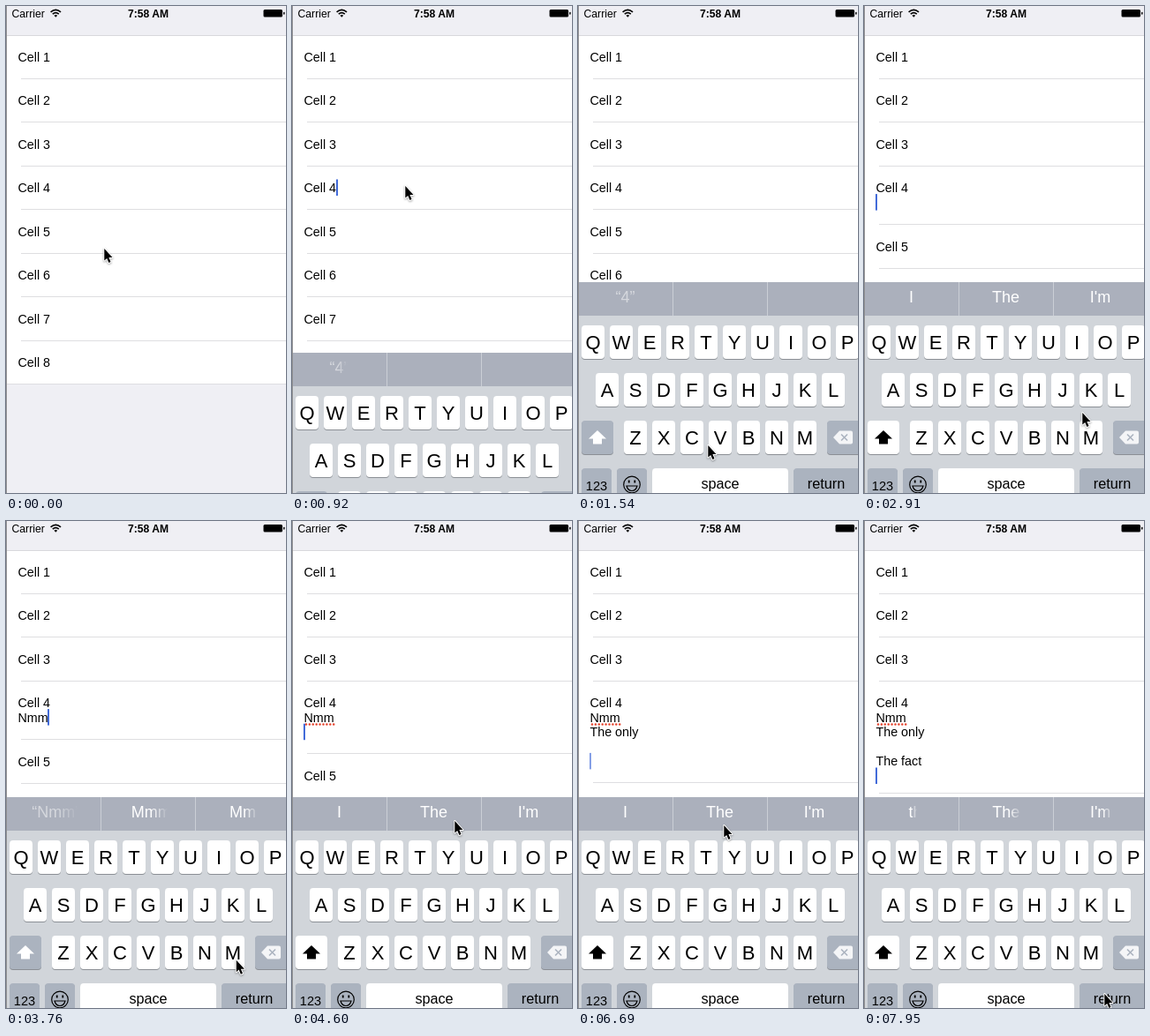
Recreate the animation shown at these times as an HTML page. Size 317 px wide and 552 px high, loop 8 s.

```html
<!DOCTYPE html>
<html lang="en">
<head>
<meta charset="utf-8">
<title>Growing table cell</title>
<style>
  html, body { margin: 0; width: 100%; height: 100%; overflow: hidden; background: #efeff4; }
  svg { display: block; width: 317px; height: 552px; font-family: "Liberation Sans", Arial, sans-serif; }
  text { white-space: pre; }
  .pointer { filter: drop-shadow(0 1px 1px rgba(0, 0, 0, .35)); }
</style>
</head>
<body>
<script>
const DURATION = 8000;
const LINE = 16.6, GROW = 16.5, ROW = 49.5;
const BODY = 14.3, WORD = 18;
const FONT = '"Liberation Sans", Arial, sans-serif';

function el(parent, name, attrs = {}, content) {
  const node = document.createElementNS('http://www.w3.org/2000/svg', name);
  set(node, attrs);
  if (content !== undefined) node.textContent = content;
  return parent.appendChild(node);
}
function set(node, attrs) {
  for (const key in attrs) node.setAttribute(key, attrs[key]);
}
const rect = (parent, x, y, width, height, fill, rx = 0) =>
  el(parent, 'rect', { x, y, width, height, fill, rx });
const label = (parent, x, y, size, content, attrs = {}) =>
  el(parent, 'text', { x, y, 'font-size': size, ...attrs }, content);
const middle = { 'text-anchor': 'middle' };

const pen = document.createElement('canvas').getContext('2d');
function measure(content, size) {
  pen.font = size + 'px ' + FONT;
  return pen.measureText(content).width;
}
const clamp = v => Math.max(0, Math.min(1, v));
const smooth = v => (v = clamp(v), v * v * (3 - 2 * v));
const easeOut = v => 1 - (1 - clamp(v)) ** 2;

// time, lines of cell 4, suggestions
const starters = ['I', 'The', "I'm"];
const edits = [
  [0, 'Cell 4', ['', '', '']],
  [800, 'Cell 4', ['“4”', '', '']],
  [2490, 'Cell 4\n', starters],
  [3230, 'Cell 4\nN', ['“N”', 'No', 'Not']],
  [3480, 'Cell 4\nNm', ['“Nm”', 'Nm', 'Mm']],
  [3680, 'Cell 4\nNmm', ['“Nmm”', 'Mmm', 'Nm']],
  [4060, 'Cell 4\nNmm\n', starters],
  [4850, 'Cell 4\nNmm\nThe ', ['first', 'only', 'same']],
  [5240, 'Cell 4\nNmm\nThe only ', ['thing', 'way', 'one']],
  [5720, 'Cell 4\nNmm\nThe only \n', starters],
  [6080, 'Cell 4\nNmm\nThe only \n\n', starters],
  [6740, 'Cell 4\nNmm\nThe only \n\nThe ', ['first', 'fact', 'same']],
  [7040, 'Cell 4\nNmm\nThe only \n\nThe fact ', ['that', 'is', 'of']],
  [7755, 'Cell 4\nNmm\nThe only \n\nThe fact \n', starters]
].map(([time, text, words]) => ({ time, lines: text.split('\n'), words }));

// time, x, y of the pointer tip
const pointerPath = [
  [0, 111, 275], [320, 126, 196], [500, 128, 204], [1000, 128, 204],
  [1540, 147, 498], [1640, 152, 502], [2330, 278, 536], [2560, 278, 536],
  [2910, 247, 461], [3110, 247, 461], [3220, 225, 488], [3280, 225, 488],
  [3440, 255, 490], [3700, 255, 490], [3920, 284, 531], [4130, 282, 535],
  [4600, 184, 340], [4780, 180, 338], [4900, 172, 336], [5260, 166, 335],
  [5580, 284, 527], [5760, 280, 535], [6120, 280, 535], [6460, 180, 362],
  [6690, 165, 345], [6780, 165, 340], [7060, 165, 338], [7240, 238, 490],
  [7520, 272, 536], [8000, 272, 536]
];

const svg = el(document.body, 'svg', { viewBox: '0 0 317 552' });
const defs = el(svg, 'defs');
rect(svg, 0, 0, 317, 552, '#efeff4');

// Table: rows above the edited cell stay, the rest shift down.
const sheet = rect(svg, 0, 33, 317, 8 * ROW, '#fff');
rect(svg, 0, 33, 317, 1, '#d8d8dc');
const lower = el(svg, 'g');
for (let i = 0; i < 8; i++) {
  const group = i < 3 ? svg : lower;
  const left = i < 7 ? 17 : 0;
  rect(group, left, Math.floor(32.9 + ROW * (i + 1)), 317 - left, 1, '#dedee1');
  if (i !== 3) label(group, 13.5, Math.floor(63 + ROW * i), BODY, 'Cell ' + (i + 1));
}
const lineTexts = Array.from({ length: 6 }, (_, i) => label(svg, 13.5, Math.round(211 + LINE * i), BODY, ''));
const squiggle = el(svg, 'path', {
  d: 'M16 230.5H48', stroke: '#e4452f', 'stroke-width': 2.6,
  'stroke-linecap': 'round', 'stroke-dasharray': '0 3.9'
});
const caret = rect(svg, 13, 0, 2, 18.5, '#426bd9');

// Status bar
label(svg, 6.5, 13, 12.2, 'Carrier');
label(svg, 161, 13, 12.1, '7:58 AM', { ...middle, 'font-weight': 'bold' });
const wifi = el(svg, 'g', { fill: 'none', stroke: '#000', 'stroke-width': 1.7 });
el(wifi, 'path', { d: 'M50.6 6.9Q56.3 1.9 62 6.9M52.8 9.2Q56.3 6.2 59.8 9.2' });
el(wifi, 'path', { d: 'M54.4 10.8Q56.3 9.2 58.2 10.8L56.3 12.8Z', fill: '#000', stroke: 'none' });
rect(svg, 291.5, 4, 21.5, 8.5, '#000', 1.5);
rect(svg, 314, 6.7, 1.5, 3, '#000', .7);

// Keyboard, laid out at its final position
const board = el(svg, 'g');
rect(board, 0, 313, 317, 239, '#d1d5da');
rect(board, 0, 313, 317, 38, '#abb0bc');
rect(board, 107, 313, 1, 38, '#cbcfd6');
rect(board, 214, 313, 1, 38, '#cbcfd6');

const GRAY = '#abb3bf';
function key(x, y, width, fill = '#fff') {
  rect(board, x, y + 1, width, 38, '#8b8f95', 4);
  return rect(board, x, y, width, 38, fill, 4);
}
['QWERTYUIOP', 'ASDFGHJKL', 'ZXCVBNM'].forEach((row, r) => {
  [...row].forEach((letter, i) => {
    const center = 17 + 16 * [0, 1, 3][r] + 32 * i, top = 362 + 54 * r;
    key(center - 13, top, 26);
    label(board, center, top + 27, 22, letter, middle);
  });
});
const shiftKey = key(4, 470, 36, GRAY);
const shiftArrow = el(board, 'path', {
  d: 'M22 481L32 490.5H27V496.5H17V490.5H12Z', 'stroke-linejoin': 'round'
});
key(282, 470, 46, GRAY);
el(board, 'path', { d: 'M289 489L296 481.5H309Q311 481.5 311 483.5V494.5Q311 496.5 309 496.5H296Z', fill: '#f4f5f7' });
el(board, 'path', { d: 'M298 485.5L305 492.5M305 485.5L298 492.5', stroke: GRAY, 'stroke-width': 1.6 });
key(4, 524, 34, GRAY);
label(board, 21, 549, 14.6, '123', middle);
key(44, 524, 34, GRAY);
const face = el(board, 'g', { fill: 'none', stroke: '#000', 'stroke-width': 1.2 });
el(face, 'circle', { cx: 61, cy: 542.5, r: 9.3 });
el(face, 'path', { d: 'M55 544H67Q65.5 549.5 61 549.5T55 544Z' });
el(face, 'path', { d: 'M57.7 537.5V540.5M64.3 537.5V540.5', 'stroke-width': 1.8 });
key(84, 524, 154);
label(board, 161, 547, 16.2, 'space', middle);
key(244, 524, 84, GRAY);
label(board, 281, 547, 16.2, 'return', middle);

const slots = [53.5, 160.5, 267.5].map((center, i) => {
  const gradient = el(defs, 'linearGradient', { id: 'fade' + i, gradientUnits: 'userSpaceOnUse', y1: 0, y2: 0 });
  el(gradient, 'stop', { offset: 0, 'stop-color': '#fff' });
  el(gradient, 'stop', { offset: 1, 'stop-color': '#fff', 'stop-opacity': 0 });
  return { center, gradient, text: label(board, 0, 336, WORD, '', { fill: `url(#fade${i})` }) };
});

rect(svg, 0, 0, 1, 552, '#8c8c8e');
const pointer = el(svg, 'path', {
  class: 'pointer',
  d: 'M.3 0V13.6L3.2 10.9 5.4 16 7.5 15.1 5.4 10.1H9.5Z',
  stroke: '#fff', 'stroke-width': 2, 'paint-order': 'stroke', 'stroke-linejoin': 'round'
});

// The wider of the two words is shown in a window that changes width.
function drawSlot(slot, before, after, progress) {
  const from = measure(before, WORD), to = measure(after, WORD);
  const width = from + (to - from) * progress;
  const done = progress >= 1 || before === after;
  const start = slot.center - (before && after ? width : Math.max(from, to)) / 2;
  slot.text.textContent = !done && from > to ? before : after;
  set(slot.text, { x: start, opacity: after.startsWith('“') ? .5 : 1 });
  set(slot.gradient, {
    x1: start + (done ? 100 : width * .6),
    x2: start + (done ? 110 : width + 4)
  });
}

function caretAlpha(age) {
  const phase = age % 1000;
  return phase < 860 ? 1 - clamp((phase - 540) / 200) : (phase - 860) / 140;
}

function draw(t) {
  const index = edits.findLastIndex(e => e.time <= t);
  const { time, lines, words } = edits[index];
  const previous = edits[Math.max(0, index - 1)];
  const last = lines[lines.length - 1];
  const typing = t >= 800;

  const growth = edits.reduce((sum, e, i) =>
    sum + (i && e.lines.length > edits[i - 1].lines.length ? GROW * smooth((t - e.time) / 300) : 0), 0);
  set(lower, { transform: `translate(0 ${Math.round(growth)})` });
  set(sheet, { height: 8 * ROW + growth });

  lineTexts.forEach((node, i) => { node.textContent = lines[i] || ''; });
  set(squiggle, { opacity: lines.length > 2 ? 1 : 0 });
  set(caret, {
    x: Math.round(13 + measure(last, BODY)),
    y: 196.5 + LINE * (lines.length - 1),
    opacity: typing ? caretAlpha(t - time) : 0
  });

  const s = Math.max(0, t - 800) * .0188;
  set(board, {
    transform: `translate(0 ${Math.round(239 * (1 + s) * Math.exp(-s))})`,
    visibility: typing ? 'visible' : 'hidden'
  });
  set(shiftKey, { fill: last ? GRAY : '#fff' });
  set(shiftArrow, { fill: last ? '#fff' : '#000' });
  slots.forEach((slot, i) => drawSlot(slot, previous.words[i], words[i], easeOut((t - time) / 240)));

  const next = pointerPath.findIndex(p => p[0] > t);
  const [t0, x0, y0] = pointerPath[next - 1], [t1, x1, y1] = pointerPath[next];
  const p = smooth((t - t0) / (t1 - t0));
  set(pointer, { transform: `translate(${x0 + (x1 - x0) * p} ${y0 + (y1 - y0) * p})` });
}

function tick() {
  draw(performance.now() % DURATION);
  requestAnimationFrame(tick);
}
tick();
</script>
</body>
</html>
```
